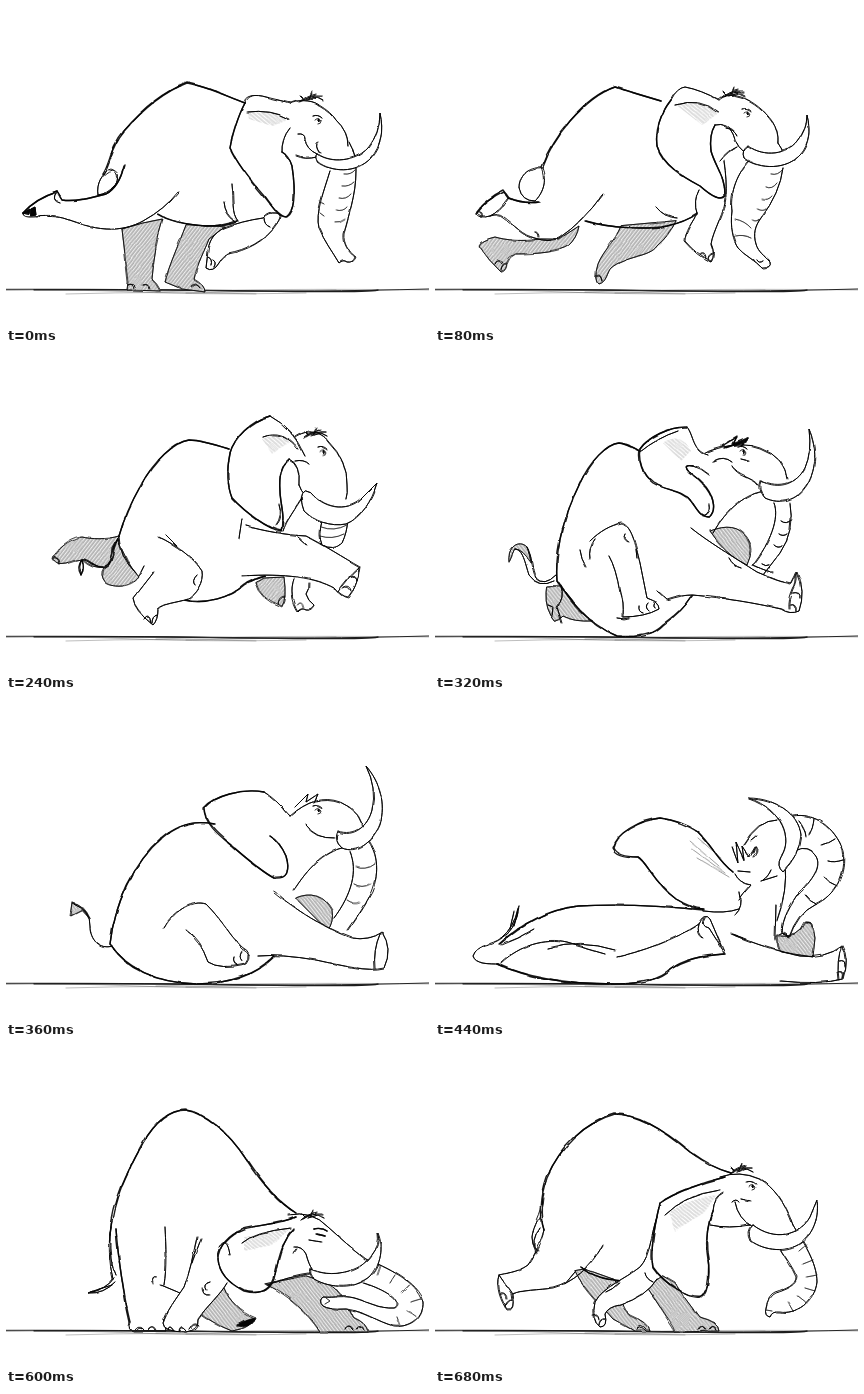
Animation, 423 px wide and 319 px high, one loop 0.76 s. Source, as an HTML page without scripts:

```html
<!DOCTYPE html>
<html lang="en">
<head>
<meta charset="utf-8">
<title>Running elephant</title>
<style>
html, body { margin: 0; width: 100%; height: 100%; overflow: hidden; background: #fff; }
svg { display: block; width: 100%; height: 100%; }
path { fill: none; stroke: #1c1c1c; stroke-width: 1; stroke-linecap: round; stroke-linejoin: round; }
.b { stroke-width: 1.4; }
.t { stroke-width: .7; stroke: #444; }
.w { fill: #fff; }
.h { fill: url(#hatch); stroke-width: .8; }
.r .h { fill: url(#back); }
.e { fill: url(#light); stroke: none; }
.k { fill: #222; }
.p { visibility: hidden; filter: url(#pencil); animation: two 760ms step-end infinite; animation-delay: calc(var(--t) * 1ms - 760ms); }
.one { animation-name: one; }
@keyframes two { 0% { visibility: visible; } 10.5263%, 100% { visibility: hidden; } }
@keyframes one { 0% { visibility: visible; } 5.2632%, 100% { visibility: hidden; } }
</style>
</head>
<body>
<svg viewBox="0 0 423 319" preserveAspectRatio="none">
<defs>
  <!-- two wobbly passes of each line, like a pencil sketch -->
  <filter id="pencil" filterUnits="userSpaceOnUse" x="0" y="0" width="423" height="319" color-interpolation-filters="sRGB">
    <feTurbulence type="fractalNoise" baseFrequency=".035" numOctaves="2" seed="3" result="n1"/>
    <feTurbulence type="fractalNoise" baseFrequency=".05" numOctaves="2" seed="8" result="n2"/>
    <feDisplacementMap in="SourceGraphic" in2="n1" scale="3" xChannelSelector="R" yChannelSelector="G" result="one"/>
    <feDisplacementMap in="SourceGraphic" in2="n2" scale="3" xChannelSelector="R" yChannelSelector="G" result="two"/>
    <feBlend in="one" in2="two" mode="multiply"/>
  </filter>
  <pattern id="hatch" width="2.8" height="2.8" patternUnits="userSpaceOnUse" patternTransform="rotate(-52)">
    <rect width="3" height="3" fill="#f6f6f6"/><path d="M0 1H3" style="stroke:#999;stroke-width:.6"/>
  </pattern>
  <pattern id="back" href="#hatch" patternTransform="rotate(52)"/>
  <pattern id="light" width="3" height="3" patternUnits="userSpaceOnUse" patternTransform="rotate(40)">
    <path d="M0 1H3" style="stroke:#bbb;stroke-width:.5"/>
  </pattern>
  <g id="eye">
    <path class="t" d="M-3 0Q0-3 3 1Q3 4 0 4"/>
    <path class="k" d="M.5-1q1.5 1 .3 3q-1.5-1-.3-3"/>
    <path d="M-5-4Q0-6 4-2"/>
  </g>
  <g id="hair">
    <path d="M-11 3Q-4-3 5-5M-9 2Q0-4 11-3M-7 0L-10-3M-2 0L1-7M-4 1L6-2L12 1"/>
  </g>
</defs>

<!-- ground -->
<path d="M0 283.3Q120 283 210 284.6T423 283"/>
<path class="b" d="M28 283.8Q140 283.3 250 285T372 284"/>
<path class="t" style="opacity:.5" d="M0 284.5Q60 283 130 286T300 287M60 288Q160 285 250 288M150 286Q270 282 423 284M180 287L330 284"/>

<g class="p" style="--t:0">
  <path class="h" d="M116 223L122 276L121 284L155 285Q151 277 146 273Q149 238 157 213Q137 216 116 223M180 219C172 240 162 262 159 276L176 283L199 286Q199 279 188 273C191 258 199 244 203 233L219 221z"/>
  <path class="w" d="M324 165C318 185 309 207 313 222C318 235 326 245 333 257Q337 253 341 256Q347 257 349 251C342 246 337 238 338 228C342 210 350 190 350 165Q351 150 343 136"/>
  <path class="t" d="M338 168Q345 169 349 164M336 180Q343 181 348 176M333 192Q340 194 345 188M330 204Q337 206 341 201M329 216Q334 217 339 213M314 207l4 3M314 195l4 3"/>
  <path class="w" d="M218 222C207 228 203 235 202 245L200 262Q207 267 213 257C216 252 219 250 222 248C240 245 260 235 270 219Q278 208 270 207Q262 206 257 212Q236 215 218 222"/>
  <path d="M258 212Q258 219 264 221M202 251q5 2 3 8M207 254q4 2 1 7M185 280q5-5 9 2M122 279q6-3 7 4M137 279q6-2 7 4"/>
  <path class="b" d="M97 168C104 158 104 141 118 125C138 102 160 85 181 77C200 80 220 90 239 97M152 208C165 216 185 219 200 220Q218 220 231 215M17 207C26 197 38 190 51 186L56 194C70 196 85 192 100 188Q113 181 118 160"/>
  <path d="M17 207Q16 212 28 211C40 210 52 210 60 213C75 218 85 222 100 223C115 224 128 220 137 215Q159 203 172 186M51 186Q44 195 54 197M92 189C90 178 96 166 106 164C114 166 112 177 108 180Q101 188 92 189M226 178C228 195 225 207 232 215M218 196Q219 209 229 215"/>
  <path class="k" d="M17 207l7-4l-1 5zM25 203l4-2l1 8l-5 1z"/>
  <path class="e" d="M242 107Q265 104 282 113L266 120L243 113z"/>
  <path class="b" d="M239 97C232 110 226 130 224 142C230 155 245 175 258 190C266 200 272 211 280 211C291 204 289 180 286 160Q283 150 276 146"/>
  <path d="M239 97C239 89 250 88 260 91L285 97M241 106Q265 103 283 113M276 146Q275 133 284 122M285 97C290 94 305 93 313 99Q325 106 330 114Q342 125 342 140M292 128Q299 127 299 133Q300 143 311 148M290 150Q299 154 311 151M314 147Q308 139 312 136"/>
  <path class="w" d="M311 148C325 158 350 155 362 142Q374 127 374 107C378 125 375 140 365 152C350 168 325 166 312 156Q308 151 311 148"/>
  <use href="#eye" x="312" y="114"/><use href="#hair" x="305" y="93"/>
</g>

<g class="p" style="--t:80">
  <path class="h" d="M105 233C88 236 70 234 60 231Q46 234 44 240Q54 255 66 266Q72 266 72 256Q73 251 80 248Q120 248 133 240Q142 232 144 220L124 233zM186 220C180 235 168 245 163 258Q158 274 164 278C172 276 172 266 176 262C190 250 215 251 222 240Q234 230 241 215z"/>
  <path d="M314 155C300 170 295 190 297 205C295 220 298 235 303 242C310 250 320 254 327 262Q337 262 335 256C330 250 323 246 321 238C318 228 320 220 326 212Q345 187 348 162M343 137Q348 143 348 149M289 155Q292 175 291 190M322 254q2 4 6 1"/>
  <path class="t" d="M336 168Q343 170 348 163M331 181Q337 184 342 177M327 193Q333 195 337 190M322 203Q327 206 331 203M318 214Q322 217 326 212M300 213Q310 215 316 222M300 230Q308 228 316 232"/>
  <path class="w" d="M262 208C258 215 250 226 250 235Q263 250 276 256Q281 250 276 238C278 225 290 205 291 192"/>
  <path d="M266 248q4-2 5 4M273 254q0-5 5-6M161 270q5-4 6 5M60 258q3-7 7 0M66 264q1-6 5-6M42 206q6-1 4 5"/>
  <path class="b" d="M107 162C112 148 122 130 135 115C150 98 165 86 180 81Q202 88 226 95M151 215C175 222 210 224 232 220Q250 216 262 208M41 208C45 200 58 190 69 185L74 192Q88 198 104 196"/>
  <path d="M107 162C92 160 84 172 84 182Q87 195 100 195C107 188 113 176 107 162M41 208Q44 213 55 210Q64 206 74 192M55 210Q64 207 68 211C78 218 88 230 100 232Q114 237 124 232Q148 216 168 188M262 208Q258 195 264 184M221 201Q230 212 242 212M100 226q4 0 4 5"/>
  <path class="e" d="M240 98Q265 94 283 106L267 119z"/>
  <path class="b" d="M236 94C225 108 220 125 222 140C228 160 250 172 265 180Q284 197 290 190C291 172 280 160 276 145Q274 129 280 119"/>
  <path d="M236 94Q242 82 250 81Q266 84 284 94M240 99Q266 91 283 106M280 119Q293 116 298 128Q302 143 313 148M284 94Q292 86 306 91C318 95 330 105 337 115Q344 126 343 137M285 155Q293 145 302 141M291 122q8 1 11 8"/>
  <path class="w" d="M313 140C330 152 352 148 362 135Q372 123 372 109C376 125 374 138 366 148C352 164 325 164 309 152Q306 144 313 140"/>
  <use href="#eye" x="312" y="107"/><use href="#hair" x="298" y="89"/>
</g>

<g class="p" style="--t:160">
  <path class="h" d="M100 200C82 206 66 204 58 206C48 214 42 224 44 230Q53 236 62 228Q84 234 102 224zM205 238C208 250 214 262 222 272Q231 270 232 258Q248 246 254 230z"/>
  <path d="M308 160C298 180 290 205 292 225C294 240 300 252 308 260Q317 260 320 252Q310 244 314 230C322 210 340 190 344 165"/>
  <path class="t" d="M328 180Q334 184 339 178M321 195Q328 200 331 194M315 210Q320 213 324 208"/>
  <path class="w" d="M258 190C285 196 295 210 306 225Q324 236 318 256Q309 264 300 252C285 240 262 236 240 224"/>
  <path class="b" d="M109 175C115 155 128 132 140 117C155 98 168 86 182 83Q204 91 226 96M145 234C175 244 215 242 240 225"/>
  <path class="w" d="M168 190C165 205 155 225 140 236C125 244 112 246 108 252Q105 267 95 268Q84 255 84 242Q104 228 111 205"/>
  <path d="M109 173Q108 190 111 205M109 174C94 174 90 187 94 198Q95 211 84 214M92 258q5-4 7 6M310 252q0-5 7-5"/>
  <path class="e" d="M248 92Q270 84 286 99L268 112z"/>
  <path class="b" d="M250 73C232 82 222 105 221 125C222 148 240 164 270 180C284 182 278 160 275 145Q272 123 282 112"/>
  <path d="M250 73Q274 76 290 94M248 92Q272 84 288 100M282 112Q294 112 296 130Q301 145 313 150M287 90Q300 81 314 89Q341 106 342 135M280 168Q289 151 300 141"/>
  <path class="w" d="M309 140C326 155 349 152 359 139Q369 128 371 119C372 136 366 149 354 161C339 172 318 168 303 155Q299 145 309 140"/>
  <use href="#eye" x="315" y="103"/><use href="#hair" x="301" y="86"/>
</g>

<g class="p" style="--t:240">
  <path class="h" d="M113 183C100 187 85 186 76 184C62 186 50 198 46 206Q49 212 60 210Q68 207 76 206Q86 216 98 214Q106 212 107 195zM112 186Q120 210 133 224C125 235 108 235 100 230Q93 222 98 214Q107 211 107 195zM250 230Q254 246 276 254Q281 246 278 224L258 225z"/>
  <path class="b" d="M112 186C106 195 108 210 98 214C88 216 82 204 76 206Q70 213 75 222Q79 214 76 207"/>
  <path d="M288 226C284 236 286 250 292 259Q296 254 300 257Q306 258 308 252Q302 248 300 241Q304 235 303 230M46 205q7-2 7 6M272 251q1-7 7-7M316 168Q312 182 316 192Q328 198 336 190Q341 180 342 166M298 142C290 155 280 168 277 178"/>
  <path class="t" d="M315 174Q328 179 341 172M314 183Q326 187 338 181M292 252q4-6 6 3"/>
  <path class="w" d="M240 173C258 178 280 182 300 183C318 192 338 205 354 214Q352 233 342 245Q335 244 328 235C310 225 280 220 236 223"/>
  <path d="M292 184q7 6 9 8M354 214Q339 227 332 239M343 224q8-3 8 4M337 235q6-3 8 3"/>
  <path class="b" d="M113 183C118 165 126 148 135 132C148 108 168 89 183 87Q194 87 223 96M178 247C200 252 225 244 238 232Q247 226 259 223"/>
  <path class="w" d="M153 184C170 192 188 205 196 218C198 230 190 240 182 246C170 250 158 250 152 256Q152 267 147 272Q128 257 127 246Q137 233 148 219"/>
  <path d="M113 183Q113 204 130 220M160 182L171 193M191 222q-6 6-2 10M138 266q5-8 7 4M146 270q0-7 5-8M236 166l-3 19M138 213l-5 10"/>
  <path class="e" d="M256 86Q270 78 285 89L266 100z"/>
  <path class="b" d="M264 63C245 68 228 85 224 100C220 120 222 135 226 145C240 160 262 176 275 178C280 165 274 150 274 138Q272 115 283 106"/>
  <path d="M264 63Q287 75 299 103M257 84Q277 76 292 96M270 172Q277 162 273 151M283 106Q295 111 293 132M289 84C300 76 315 78 322 88Q342 108 341 132Q342 140 340 146M293 132Q297 144 309 149M289 108q9-2 14 3"/>
  <path class="w" d="M305 140C320 158 345 158 357 144L371 130C366 148 355 165 340 171C325 174 308 168 298 158Q292 142 299 138z"/>
  <use href="#eye" x="317" y="98"/><use href="#hair" x="309" y="82"/>
</g>

<g class="p one r" style="--t:320">
  <path class="h" d="M112 234L126 233C134 248 144 260 158 268Q138 269 128 263Q124 268 120 268Q110 257 111 240zM74 208C72 194 84 186 92 194Q95 201 96 210Q88 196 80 196zM275 178Q300 168 312 184Q320 195 312 212Q292 204 275 178"/>
  <path d="M126 233Q130 247 122 254L127 270M113 252l5 2l-1 9M121 222Q109 234 101 225C96 216 98 204 92 194M80 196C88 196 90 210 94 222Q104 236 119 228M355 150Q360 178 345 200L328 222M339 150C345 165 335 190 318 212M318 212Q335 220 338 219M330 138C312 140 292 155 278 180"/>
  <path d="M346 168Q351 172 357 167M344 181Q348 184 352 181M339 192Q343 196 347 193M327 211Q331 214 334 212"/>
  <path class="b" d="M122 228C120 200 128 165 145 130C155 108 172 91 184 90Q190 90 205 98M122 228C130 240 150 270 182 283Q215 286 228 272Q248 258 258 242"/>
  <path class="w" d="M256 175C272 188 300 205 322 219Q345 229 356 231L362 219Q371 238 364 258Q355 262 346 256C320 250 290 245 258 242Q247 242 232 247"/>
  <path d="M361 221Q362 230 358 236Q353 247 354 256M358 240q8-2 7 5M355 252q7-2 6 6M294 205q4 8 12 10"/>
  <path class="w" d="M155 188C165 178 176 172 187 170C197 174 200 190 205 210L212 245Q224 249 224 256Q210 264 187 264Q188 248 185 240Q181 215 174 203" style="stroke-dasharray:none"/>
  <path d="M160 186Q153 195 155 206M190 181q-3 5 3 8M204 253q-1 6 4 7M213 250q-4 4 1 8M221 249q-4 2-1 6M201 196l1 9M145 197q1 9 6 17M222 238l10 9M182 265q6 2 12 0"/>
  <path class="e" d="M228 90Q246 78 256 98L246 108z"/>
  <path class="b" d="M252 74C235 73 212 85 205 96C203 108 207 122 218 130C232 138 248 137 256 148C262 156 265 164 274 164C281 159 280 146 271 134Q264 126 254 119Q247 111 258 113"/>
  <path d="M252 74C259 82 257 98 273 102M205 99Q222 85 243 78M258 113Q266 115 274 122M270 100Q279 96 288 94M288 94Q310 89 325 95Q350 104 352 126M297 113C302 124 318 124 323 132M278 108q11-6 19 1M306 106l8 2M268 163q8-3 6-12"/>
  <path class="b" d="M287 93L302 84L298 91L313 85L306 93M290 95L311 88"/>
  <path class="w" d="M326 128C345 138 362 130 370 115Q377 99 374 76C382 95 382 115 372 132C362 148 345 152 330 145Q322 136 326 128"/>
  <use href="#eye" x="308" y="98"/>
</g>

<g class="p one r" style="--t:360">
  <path class="h" d="M290 198Q314 188 326 210Q328 222 322 230zM84 218Q78 204 66 202L64 216L76 210z"/>
  <path d="M106 246C94 250 84 240 84 226Q85 210 66 202M358 136C372 150 374 172 366 192Q357 209 342 230M344 152C352 170 346 194 328 218M336 148C318 152 302 168 288 190"/>
  <path class="t" d="M350 167Q360 171 369 164M348 184Q356 189 364 184M341 200Q348 205 354 202"/>
  <path class="b" d="M104 244C108 205 128 162 156 138Q179 118 208 124M104 244C120 268 150 283 190 284Q240 284 268 256"/>
  <path class="w" d="M268 192C290 210 318 228 346 238Q364 241 376 232Q387 249 378 268C362 272 338 266 310 260Q275 254 252 256"/>
  <path class="w" d="M158 228C170 208 188 200 200 204C216 220 226 238 236 248Q248 254 240 264Q214 270 202 262Q194 239 180 230"/>
  <path d="M374 234Q367 250 369 268M228 257q-2 5 3 8M236 252q-4 5 0 9"/>
  <path class="b" d="M258 92C236 88 208 96 198 108C198 124 214 136 226 146C240 158 256 172 268 178Q287 180 280 156Q274 142 264 136"/>
  <path d="M258 92Q269 98 284 116M284 116Q310 93 334 102Q357 111 358 136M300 125Q310 139 328 138M289 107L302 94L300 102L312 94L308 103"/>
  <path class="w" d="M332 132C348 138 362 126 366 110Q371 88 360 66C374 82 380 104 374 124C366 144 350 154 336 148Q327 140 332 132"/>
  <use href="#eye" x="312" y="110"/>
</g>

<g class="p one r" style="--t:400">
  <path class="h" d="M318 222Q348 206 354 226L354 244L336 240z"/>
  <path d="M84 254Q60 256 62 240Q78 226 72 204M67 246Q80 232 77 208M346 164Q346 185 336 216M296 186Q301 206 286 214"/>
  <path d="M366 116C388 122 398 146 392 170C386 190 370 206 360 230L348 228C350 208 366 190 370 170Q374 150 364 146"/>
  <path class="t" d="M375 138Q383 135 387 132M376 158Q386 160 393 156M370 174Q378 181 387 179M362 190Q368 198 375 198"/>
  <path class="b" d="M82 250C94 218 118 186 152 170Q190 158 232 178L266 198M82 252C108 274 140 284 180 284Q244 284 270 262"/>
  <path class="w" d="M284 214C310 230 340 244 364 248Q382 247 394 238Q403 257 394 274C372 278 340 272 312 262Q293 256 276 258"/>
  <path d="M120 244Q155 221 196 226C220 232 244 232 258 236Q275 252 264 262C240 268 220 274 200 272Q178 256 150 248M258 237Q254 249 264 261M392 240Q386 252 388 274"/>
  <path class="b" d="M270 112C248 102 206 98 188 114C182 128 196 136 208 146C220 164 244 190 272 196Q298 198 296 172"/>
  <path d="M270 112Q282 136 294 142M300 128Q316 106 340 110Q358 113 368 120M300 158Q314 169 334 161M296 141L298 124L304 135L313 122L311 136"/>
  <path class="w" d="M338 148C352 146 360 130 356 112Q350 90 332 72C354 82 372 104 370 126C368 146 356 160 344 162Q333 156 338 148"/>
  <use href="#eye" x="315" y="134"/>
</g>

<g class="p r" style="--t:440">
  <path class="h" d="M342 236Q341 248 346 252L378 257L380 238Q378 220 370 222Q364 239 342 236"/>
  <path d="M358 116C380 112 400 128 408 150C412 175 400 195 380 205Q363 213 355 237L348 234C345 225 352 210 362 195C378 180 388 165 380 155Q373 145 362 150M371 223q7-2 6 4M345 235q5-5 9 3"/>
  <path d="M364 121Q370 128 371 137M379 119Q378 129 374 135M400 139Q393 144 387 145M408 160Q399 163 393 161M402 186Q394 183 389 177M381 204Q375 202 370 195"/>
  <path class="b" d="M64 244C85 225 110 210 143 206Q200 203 268 210M62 264C90 277 130 284 180 284Q221 284 236 269Q253 256 290 254"/>
  <path d="M64 264C54 264 40 264 38 256C42 244 58 245 66 238Q79 228 83 208M66 238Q80 233 84 206M75 229L79 211M83 212L79 226M66 263C85 245 110 238 132 243L170 254M113 249Q145 239 180 250M66 245Q83 239 99 229"/>
  <path d="M182 257C205 252 240 240 264 224Q270 212 275 219L290 254M264 224Q261 234 268 238M270 218q-5 8 4 10L288 250M268 211Q290 214 304 209M300 215Q309 207 305 192"/>
  <path class="w" d="M296 234C320 244 345 252 365 256Q390 259 407 246Q415 258 408 279Q385 285 345 281" style="fill:none"/>
  <path d="M407 246Q401 260 404 280M404 261q7-2 6 5M403 272q7-2 5 6M297 234l14 5"/>
  <path class="t" style="opacity:.4" d="M263 138L286 158M255 141L284 166M257 149L290 173M262 158L294 177"/>
  <path class="b" d="M298 172C284 162 278 147 263 132Q246 121 225 118C205 120 182 132 178 148Q182 157 203 157C211 161 220 184 241 199Q256 208 268 209"/>
  <path d="M309 145Q323 120 342 120M300 174Q304 183 316 185Q308 194 304 200M326 181L342 176M350 164Q353 190 342 220M341 205L340 240M328 180Q333 177 336 170M303 171l12 1"/>
  <path d="M297 147L303 163L301 142L309 160L307 146L314 157L320 147"/>
  <path d="M318 153q3-9 4-5t-3 9M316 140l5-4"/>
  <path class="w" d="M314 98C340 98 364 114 366 135Q364 156 348 172Q341 166 346 157C358 140 348 110 314 98"/>
</g>

<g class="p r" style="--t:520">
  <path class="h" d="M164 262L178 254L198 268L200 284L166 284zM262 246C300 252 330 262 352 284L392 284Q392 272 376 262L300 234z"/>
  <path class="w" d="M362 204C388 204 416 222 419 246C418 266 402 276 384 272Q366 262 352 262Q345 253 354 248Q382 254 392 250C398 240 380 230 360 228"/>
  <path class="t" d="M380 209L378 219M398 217L393 226M412 230L403 236M418 250L407 249M406 268L400 261"/>
  <path class="b" d="M90 226C100 180 125 135 160 116C190 106 220 128 245 156Q264 177 284 180"/>
  <path d="M90 226C92 245 100 262 112 276L112 284L150 284Q147 276 150 266Q164 239 164 208M90 222Q84 242 58 240Q74 247 91 231M164 246Q182 257 200 250M206 206C200 226 196 240 200 252Q217 274 214 284L246 284Q249 274 240 256L238 236M123 279q5-3 7 4M228 279q6-3 7 4"/>
  <path class="e" d="M240 186Q270 180 284 190L250 205z"/>
  <path class="b" d="M288 182C268 168 240 166 220 178C206 190 204 204 214 214C230 224 245 236 262 238C278 236 282 214 294 198"/>
  <path d="M288 178Q314 165 332 184Q346 197 362 204M294 200Q301 214 312 216M268 232Q290 230 312 222"/>
  <path class="w" d="M312 214C330 222 354 212 362 194Q367 179 360 164C372 178 374 200 364 216C352 232 328 234 314 224Q310 218 312 214"/>
  <use href="#eye" x="318" y="186"/><use href="#hair" x="302" y="173"/>
</g>

<g class="p r" style="--t:600">
  <path class="h" d="M190 264L203 249L218 241C223 254 236 266 249 271Q244 281 226 284Q208 277 190 264M260 237C285 250 300 265 314 285L362 285Q361 276 347 270Q338 247 322 236L300 229z"/>
  <path class="k" d="M231 278Q241 272 249 271Q246 281 231 278"/>
  <path class="w" d="M360 212C380 220 412 235 417 255C418 270 405 281 388 279C372 275 358 264 340 262Q323 263 317 259Q312 254 317 250C330 251 336 248 348 251C362 255 374 262 388 261C397 256 385 245 358 236"/>
  <path class="t" d="M374 219L371 228M389 228L384 236M403 238L396 245M415 252L405 255M410 269L401 264M394 278L391 270M320 251l4 3l-5 3"/>
  <path class="b" d="M104 188C107 150 124 120 137 96Q156 63 180 63C200 66 222 85 240 112C255 135 272 155 290 166M110 182C112 210 118 250 124 275"/>
  <path d="M105 180C102 195 103 215 107 232M104 188Q103 214 110 228M108 231Q101 242 82 246Q98 247 109 235M84 245L106 238M124 275Q121 284 128 284L160 284Q160 277 157 272M158 238C161 220 160 200 159 180M155 238Q172 244 188 254M130 283q4-6 8 0M142 283q5-7 8 0"/>
  <path class="w" d="M191 190C188 205 184 225 178 240C170 252 160 265 157 276Q157 285 180 285Q193 283 192 272C200 260 215 247 221 236"/>
  <path d="M204 235q-8 2-4 8M196 241q0 8 8 7M151 230q-6-2-4 6M162 283q1-7 6 1M173 284q2-7 7 0M183 282q5-8 9-4M339 282q3-7 8 1M350 282q4-6 8 1M262 238Q280 230 308 226M195 192l-9 24"/>
  <path class="e" d="M238 190Q266 186 286 180L266 198L238 204z"/>
  <path class="b" d="M290 170C270 178 250 178 238 182C222 188 212 200 212 212C213 225 222 236 238 244Q262 250 268 232C272 215 275 195 288 182"/>
  <path d="M213 200Q221 188 224 208M236 196Q248 185 285 181M282 168Q306 163 322 180Q340 197 360 212M288 200Q296 199 300 207Q303 218 306 222M290 202l-3 4M304 193l12 2"/>
  <path class="w" d="M304 222C325 232 355 225 366 208Q374 198 372 186C378 200 375 218 364 230C350 242 325 242 308 232Q302 227 304 222"/>
  <path class="b" d="M308 182Q316 180 321 184M311 187L319 189"/>
  <use href="#hair" x="306" y="170"/>
</g>

<g class="p r" style="--t:680">
  <path class="h" d="M140 224C150 245 170 262 178 272L200 284L215 284Q214 276 195 268Q183 260 186 240L178 232L150 222zM212 240L238 280L240 285L284 284Q284 275 264 270Q250 252 240 236L228 229z"/>
  <path class="w" d="M358 178C368 195 382 215 382 235C380 255 360 268 345 265Q337 264 335 270Q329 269 331 261Q333 249 340 246C352 242 362 238 362 230C358 220 350 210 346 203"/>
  <path class="t" d="M371 198L364 204M378 213L368 217M382 228L371 230M380 244L370 241M372 256L363 249M358 264L353 255M331 263l6 1"/>
  <path class="b" d="M109 183C105 170 105 150 112 130C125 100 150 75 180 67C205 67 235 88 255 105Q277 121 296 126M146 220C160 232 185 236 215 233"/>
  <path d="M108 152C107 170 98 178 97 190Q98 204 103 203M101 206Q95 193 105 181M109 183C106 195 100 207 93 218C82 226 70 226 64 228C60 240 66 255 72 263Q81 265 77 247C85 243 105 243 118 241Q148 233 168 198M64 228Q71 238 77 247M65 247q6-2 6 5M70 260q1-7 7-7M130 237l10-12M202 282q4-6 9 1M263 282q3-6 8 1M274 282q4-6 7 1"/>
  <path class="w" d="M222 170C215 190 216 208 205 220C190 232 168 240 160 255Q156 273 165 280Q173 280 170 267Q173 260 185 258Q212 249 222 232"/>
  <path d="M210 226q1 6 8 9M158 268q5-2 6 4M164 278q0-7 6-6M184 236q-7 7-13 9"/>
  <path class="e" d="M234 165Q258 150 282 148L268 166L240 184z"/>
  <path class="b" d="M290 130C270 135 240 145 225 156C218 185 215 205 218 220C230 238 255 252 266 250C275 245 275 220 272 205Q270 184 278 164"/>
  <path d="M230 168Q250 148 285 143M278 164Q279 150 288 146M285 130Q305 123 325 132C338 140 350 155 358 178M300 155Q303 172 318 180M275 178Q294 182 315 178M297 155q4-4 7 0M306 152l9 2"/>
  <path class="w" d="M318 178C340 195 365 188 375 170L382 153C384 168 380 185 366 196C352 206 330 204 316 194Q311 184 318 178"/>
  <use href="#eye" x="317" y="139"/><use href="#hair" x="306" y="124"/>
</g>
</svg>
</body>
</html>
```
